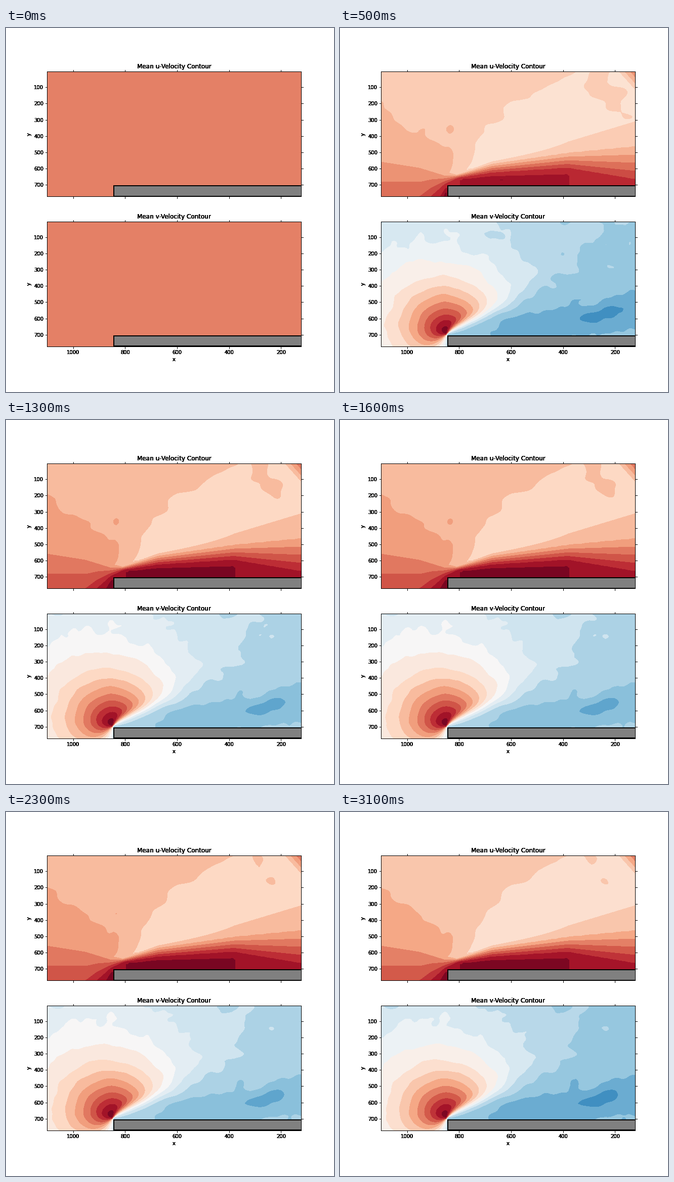
A matplotlib script for the animation above (3.2 s loop, 648 px wide and 720 px high).

```python
import numpy as np
import matplotlib
import matplotlib.pyplot as plt
from matplotlib.animation import FuncAnimation
from matplotlib.patches import Rectangle

W, H, DPI = 648, 720, 72
FRAMES, STEP_MS = 32, 100
LEFT, RIGHT = 0.125 * W, 0.9 * W
PANEL_H = 0.755 * H / 2.2
TOP_U = 0.12 * H
TOP_V = 0.875 * H - PANEL_H
TIP_X, TIP_Y = 212, 606  # leading edge of the plate in the lower panel
LAYERS = 8

plt.rcParams.update({"font.family": "DejaVu Sans", "font.size": 10})
cmap = matplotlib.colormaps["RdBu_r"]


def ramp(t):
    return 1 / (1 + np.exp(-t))


def bump(x, y, cx, cy, rx, ry):
    return np.exp(-((x - cx) / rx) ** 2 - ((y - cy) / ry) ** 2)


def mesh(top):
    return np.meshgrid(np.linspace(LEFT, RIGHT, 168), np.linspace(top, top + PANEL_H, 84))


def ripples(seed, stretch, count=60):
    """Random texture that settles down like a running mean."""
    rng = np.random.default_rng(seed)
    size = rng.uniform(13, 70, count)
    angle, phase = rng.uniform(0, 2 * np.pi, (2, count))
    drift = rng.normal(0, 0.6, count)
    weight = size / np.sqrt((size ** 2).sum() / 2)

    def texture(x, y, i):
        out = np.zeros(x.shape)
        for s, a, p, d, w in zip(size, angle, phase, drift, weight):
            along = np.cos(a) * x / stretch + np.sin(a) * y
            out += w * np.cos(2 * np.pi * along / s + p + d * np.log(i))
        return out * (1 + 1.5 / i)

    return texture


noise_u, noise_v = ripples(4, 1.8), ripples(11, 1.2)

# shear layer of u: level k lies at y = base(x) - gap(x) * k
KEY_X = [81, 157, 180, 207, 232, 300, 450, 583]
BASE = [464, 416, 363, 318, 299, 293.5, 290, 330]
GAP = [40, 28, 16, 5.3, 1.6, 4.2, 7.2, 16]


def field_u(x, y, i, late):
    """Level 0 is the dark core above the plate, 7 the lightest zone."""
    layer = (np.interp(x, KEY_X, BASE) - y) / np.interp(x, KEY_X, GAP)
    layer = np.where(layer < 2, 2 + 0.55 * (layer - 2), layer)
    squeeze = np.interp(x, [258, 450], [1, 0.32])
    layer = np.where(layer > 6, 6 + squeeze * (layer - 6), layer)
    layer = np.where(x > TIP_X, np.maximum(layer, 0.5 + abs(x - 345) / 216), layer)

    # free stream: a straight edge on the left, a curved light zone on the right
    left = np.minimum(6 + (149 + 0.82 * (x - 81) - y) / 150, 6.45)
    rise, reach = 170 + 35 * late, 85 + 20 * late
    edge = 260 - rise * (1 - np.exp(-(np.maximum(x, 200) - 258) / reach))
    far = ramp((x - 440) / 25) * ramp((185 - y) / 12)
    light = np.minimum(7 + (y - edge) / 100, 7.45 - (0.36 - 0.2 * late) * far)
    stream = np.maximum(left, light)
    stream = stream - (0.75 - 0.33 * late) * bump(x, y, 218, 200, 9, 11)
    stream -= 0.45 * bump(x, y, 216, 264, 9, 27) + 0.5 * bump(x, y, 220, 86, 6, 5)
    stream += (0.05 + 0.12 * far) * noise_u(x, y, i)

    corner = 4 + (RIGHT - x + 0.9 * (y - TOP_U)) / 11
    out = np.minimum(np.minimum(layer, stream), corner)
    if i <= 6:
        out = out - 0.9 * bump(x, y, 319, 300, 10, 2.5)
    return out


def field_v(x, y, i, late):
    """Level 0 is the peak at the leading edge, 14 the deepest blue."""
    r = np.hypot(x - TIP_X, y - TIP_Y)
    phi = (np.degrees(np.arctan2(TIP_Y - y, x - TIP_X)) + 90) % 360 - 90
    skew = 1 + 0.17 * (np.cos(np.radians(phi)) - 0.6) * np.clip(r / 200, 0, 1)
    p = (r * skew) ** 1.6
    rings = 13.5 * p / (p + 1260)
    rings -= (0.6 - 0.3 * late) * ramp((x - 430) / 40) * ramp((430 - y) / 25)
    rings -= 0.5 * bump(x, y, 208, 392, 11, 16)

    wake = 12.5 + 1.15 * ramp((x - 302) / 25) * np.exp(-((y - 600 + 0.14 * (x - 302)) / 38) ** 2)
    wake += 0.65 * bump(x, y + 0.25 * (x - 525), 525, 564, 65, 14)

    near = np.exp(-r / 30)
    shear = ramp((26 + 28 * near - phi) / (4 + 12 * near))
    front = ramp((phi - 224) / 22)
    out = rings + (wake - rings) * shear + (11.5 - rings) * front
    return out + (0.02 + 0.1 * ramp((r - 130) / 25)) * noise_v(x, y, i)


def bands_u(i):
    """Number of colour bands and offset of the first one."""
    if i <= 10:
        return 20, 1
    return (19 if i <= 16 or 21 <= i <= 26 else 18), 0


def bands_v(i):
    return (19 if 7 <= i <= 27 else 18), 0


fig = plt.figure(figsize=(W / DPI, H / DPI), dpi=DPI, facecolor="white")


def panel(top, title, last):
    box = [LEFT / W, 1 - (top + PANEL_H) / H, (RIGHT - LEFT) / W, PANEL_H / H]
    ax = fig.add_axes(box)
    ax.set(xlim=(LEFT, RIGHT), ylim=(top + PANEL_H, top), xticks=[], yticks=[])
    ax.add_patch(Rectangle((213, top + 225.8), 400, 20.5, fc="#808080", ec="black",
                           lw=2, zorder=5))
    # stacked copies give the dense, dark lettering
    for k in range(LAYERS):
        deco = fig.add_axes(box, facecolor="none", label=f"{title}{k}")
        deco.set(xlim=(1100.4, 122.4), ylim=(772.5, 4), xticks=range(200, 1001, 200),
                 yticks=range(100, 701, 100), ylabel="y")
        deco.tick_params(direction="out", top=True, right=True, labelbottom=last)
        deco.set_title(title, fontsize=12, y=1.0, pad=6)
        if last:
            deco.set_xlabel("x")
    return ax


views = [
    (panel(TOP_U, "Mean u-Velocity Contour", False), mesh(TOP_U), field_u, bands_u, 7.9),
    (panel(TOP_V, "Mean v-Velocity Contour", True), mesh(TOP_V), field_v, bands_v, 14.9),
]
LEVELS = np.arange(-1, 17)
drawn = []


def update(i):
    while drawn:
        drawn.pop().remove()
    late = np.interp(i, [8, 13, 19, 23], [0, 0.4, 0.45, 1])
    for ax, (x, y), field, bands, highest in views:
        ax.set_facecolor(cmap(0.75))
        if i == 0:
            continue
        n, off = bands(i)
        tones = np.clip(1 - (LEVELS[:-1] + off + 0.5) / n, 0, 1)
        f = np.clip(field(x, y, i, late), 0.01 - off, highest)
        drawn.append(ax.contourf(x, y, f, levels=LEVELS, zorder=1,
                                 colors=[cmap(float(t)) for t in tones]))
    return []


anim = FuncAnimation(fig, update, frames=FRAMES, interval=STEP_MS, repeat=True,
                     repeat_delay=0, blit=False)
plt.show()
```
